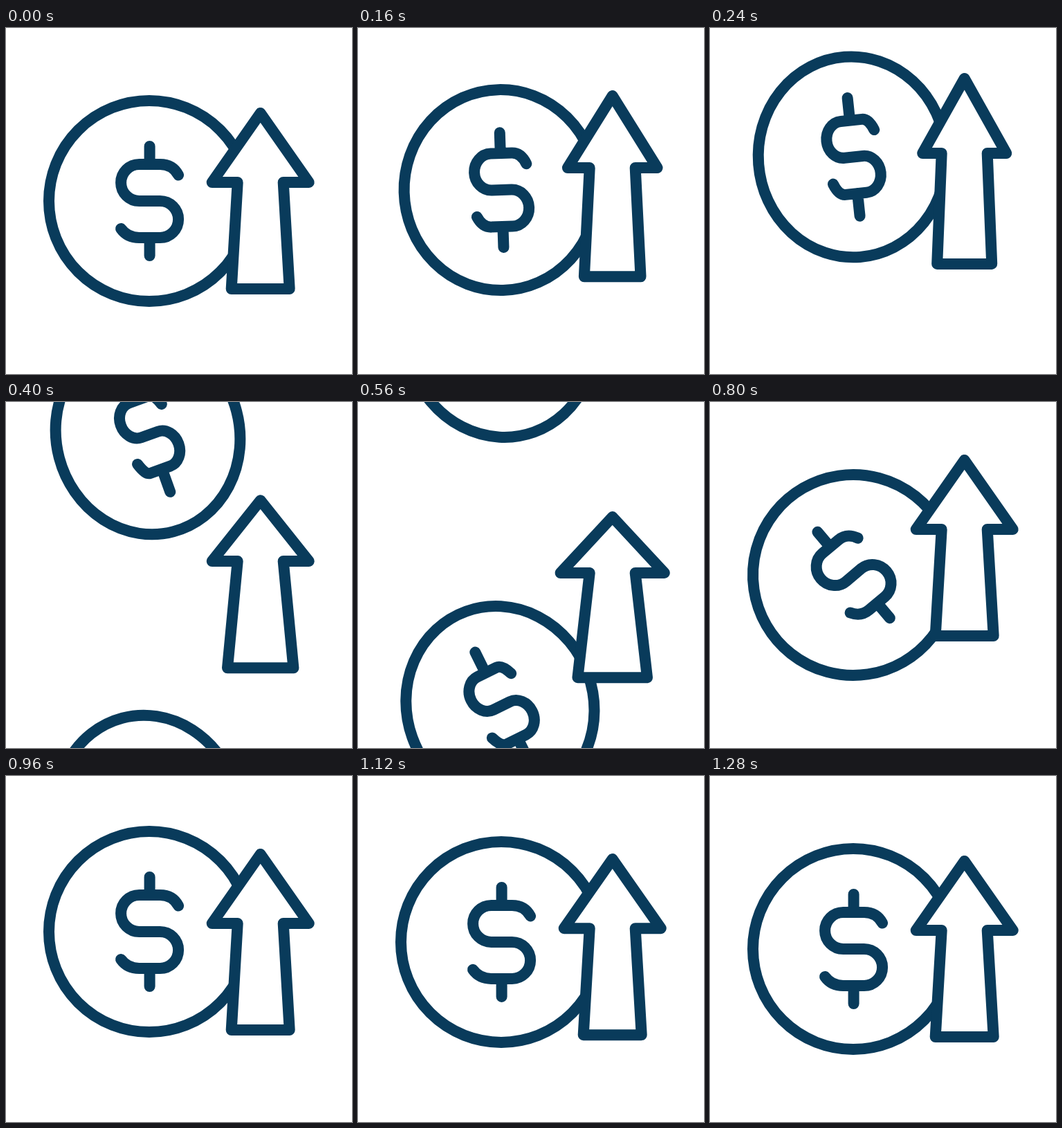
These frames come from a looping animation (500 px wide and 500 px high, 1480 ms). An HTML page:

```html
<!DOCTYPE html>
<html lang="en">
<head>
<meta charset="utf-8">
<title>Rising coin</title>
<style>
html, body { margin: 0; height: 100%; overflow: hidden; background: #fff; }
svg { display: block; width: 100vw; height: 100vh; }
</style>
</head>
<body>
<svg viewBox="0 0 500 500" fill="none" stroke="#093b5b" stroke-width="16" stroke-linecap="round" stroke-linejoin="round">
  <defs>
    <g id="coin"><ellipse id="rim" ry="145"/><path id="dollar"/></g>
  </defs>
  <use id="leaving" href="#coin"/>
  <use id="arriving" href="#coin"/>
  <path id="arrow" fill="#fff"/>
</svg>
<script>
const LOOP = 1480, STEP = 40;
const START = 80, LAND = 800, SETTLE = 960, REST = 1280;
const REST_Y = 250, SHOULDER_Y = 223;
const $ = id => document.getElementById(id);

// Smooth track through [time, value] keys, flat at turning points and outside.
function track(...keys) {
  const secant = ([t0, v0], [t1, v1]) => (v1 - v0) / (t1 - t0);
  const slopes = keys.map((key, i) => {
    if (i === 0 || i === keys.length - 1) return 0;
    const a = secant(keys[i - 1], key), b = secant(key, keys[i + 1]);
    return a * b > 0 ? 2 * a * b / (a + b) : 0;
  });
  return t => {
    const next = keys.findIndex(key => key[0] > t);
    if (next <= 0) return (next ? keys[keys.length - 1] : keys[0])[1];
    const i = next - 1, [t0, v0] = keys[i], [t1, v1] = keys[next];
    const d = t1 - t0, u = (t - t0) / d, w = 1 - u;
    return v0 * w * w * (1 + 2 * u) + v1 * u * u * (3 - 2 * u)
      + d * u * w * (slopes[i] * w - slopes[next] * u);
  };
}

// Rises from 0 to 1 and back between two times; a lean below 1 peaks earlier.
function bump(t, from, to, lean) {
  const u = Math.min(1, Math.max(0, (t - from) / (to - from)));
  return Math.sin(Math.PI * u ** lean);
}

const tilt = track([START, 0], [240, 6], [400, 19.7], [560, 26.3], [LAND, 40], [SETTLE, 0]);
const lift = track([START, 0], [240, 42], [400, -7], [560, -24], [LAND, 39], [SETTLE, 10], [REST, 0]);
const squash = track([START, 0], [240, -.38], [500, 1.05], [LAND - 40, 0]);

// Constant acceleration, then constant speed.
function leaveY(t) {
  const speed = .875, ramp = 176, s = Math.max(0, t - START);
  return REST_Y - speed * (s < ramp ? s * s / (2 * ramp) : s - ramp / 2);
}

// Slows down on the way up, overshoots and sinks back.
function arriveY(t) {
  const speed = .6675, s = t - LAND;
  if (s < 0) return REST_Y - speed * s + s * s / 2000;
  const fade = Math.sqrt(Math.max(0, 1 - s / (REST - LAND)));
  return REST_Y - speed * s * Math.exp(-s / 128) * fade;
}

function dollarPath(k) {
  const s = 1 - .16 * k, x = 15 * s, r = 26.5 * s, stem = 79 + 9 * k;
  const end = 41.5 - 10.5 * k, join = 15 + 3 * k, bend = join + 13 - 8 * k, knee = end - 5 + k;
  return `M0-53V${-stem}M0 53V${stem}
    M${end} ${2 * k - 37.5}C${knee}-47 ${bend}-53 ${join}-53H${-x}A${r} 26.5 0 0 0 ${-x} 0
    H${x}A${r} 26.5 0 0 1 ${x} 53H${-join}C${-bend} 53 ${-knee} 47 ${-end} ${40 - 5.5 * k}`;
}

function arrowPath(t, pull) {
  const q = squash(t), x = 367.7, y = SHOULDER_Y - lift(t);
  const tip = y - 100 + 21 * q, base = y + 154 - 7 * q + 4.4 * pull;
  const wing = 70 + 11.7 * q - 6.8 * pull, foot = 42 + 8.3 * q + .9 * pull;
  return `M${x} ${tip}L${x + wing} ${y}H${x + 33}L${x + foot} ${base}
    H${x - foot}L${x - 33} ${y}H${x - wing}Z`;
}

function draw(t) {
  const pull = bump(t, START, LAND, .88), angle = tilt(t);
  const squeeze = Math.max(0, bump(t, START, SETTLE, .686)) ** 1.5;
  $("rim").setAttribute("rx", 145 - 12.5 * pull);
  $("rim").setAttribute("transform", `translate(${-2 * pull}) rotate(${-.75 * angle})`);
  $("dollar").setAttribute("d", dollarPath(squeeze));
  $("dollar").setAttribute("transform", `translate(.6) rotate(${-angle})`);
  $("leaving").setAttribute("transform", `translate(207 ${leaveY(t)})`);
  $("arriving").setAttribute("transform", `translate(207 ${arriveY(t)})`);
  $("leaving").style.display = t < LAND ? "" : "none";
  $("arriving").style.display = t > START ? "" : "none";
  $("arrow").setAttribute("d", arrowPath(t, pull));
}

function tick() {
  const t = performance.now() % LOOP;
  draw(Math.floor(t / STEP) * STEP);
  requestAnimationFrame(tick);
}
tick();
</script>
</body>
</html>
```
